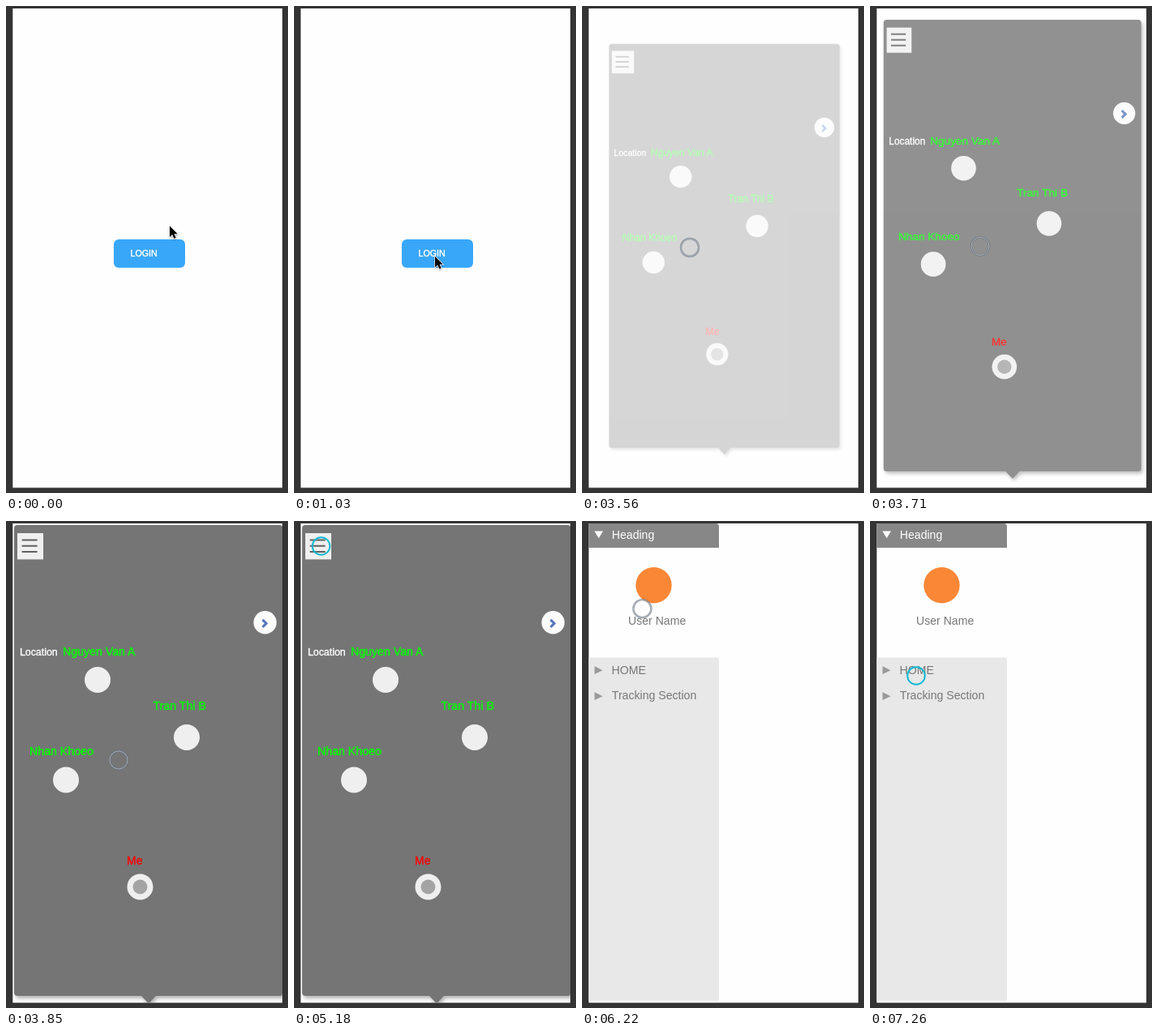
An HTML page that plays this animation: 348 by 601 pixels, repeating every 8 s.

```html
<!DOCTYPE html>
<html lang="en">
<head>
<meta charset="utf-8">
<title>Prototype walkthrough</title>
<style>
  html, body { margin: 0; width: 100%; height: 100%; overflow: hidden; background: #343434; }
  svg { display: block; width: 100%; height: 100%; }
  text { font: 14.1px "Liberation Sans", Arial, sans-serif; }
  .page { transform-origin: 174.5px 299px; }
  .login-label { font-size: 10.7px; fill: #fff; stroke: #fff; stroke-width: .4px; }
  .caption { font-size: 12.4px; fill: #fff; stroke: #fff; stroke-width: .35px; }
  .friend { font-size: 14.2px; fill: #0f0; stroke: #0f0; stroke-width: .35px; }
  .me { fill: #f00; stroke: #f00; stroke-width: .35px; }
  .menu-text { fill: #777; }
  .panel { fill: #757575; filter: drop-shadow(2px 3px 2px rgba(0, 0, 0, .3)); }
  .dot { fill: #efefef; }
  .ring { fill: none; }
  #arrow { filter: drop-shadow(0 1px 1px rgba(0, 0, 0, .35)); }
</style>
</head>
<body>
<svg viewBox="0 0 348 601">
  <defs>
    <clipPath id="screen"><rect x="8.3" y="3" width="332.7" height="591.5"/></clipPath>
  </defs>
  <rect width="348" height="601" fill="#343434"/>
  <rect x="8.3" y="3" width="332.7" height="591.5" fill="#fefefe"/>

  <g clip-path="url(#screen)">
    <g id="login" class="page">
      <rect x="133" y="288" width="88" height="35" rx="6" fill="#38a7f9"/>
      <text class="login-label" x="153.5" y="309">LOGIN</text>
    </g>

    <g id="map" class="page">
      <g class="panel">
        <rect x="10" y="5" width="331.5" height="581" rx="4"/>
        <path d="M166.5 585.5H185.5L176 595.5Z"/>
      </g>
      <rect class="dot" x="14" y="15" width="32" height="32.4"/>
      <path d="M19.6 23.4H38.6M19.6 30.7H38.6M19.6 38H38.6" stroke="#606060" stroke-width="2"/>
      <circle cx="319.7" cy="125.3" r="14.2" fill="#fcfcfc"/>
      <path d="M316.6 121.8L321.2 126.4L316.6 131" fill="none" stroke="#5677bb" stroke-width="3.1"/>
      <text class="caption" x="16.9" y="166">Location</text>
      <text class="friend" x="69.9" y="166">Nguyen Van A</text>
      <text class="friend" x="181.5" y="232.5">Tran Thi B</text>
      <text class="friend" x="29" y="288.5">Nhan Khoeo</text>
      <text class="me" x="149" y="424">Me</text>
      <circle class="dot" cx="113" cy="196" r="16"/>
      <circle class="dot" cx="223" cy="267" r="16"/>
      <circle class="dot" cx="74" cy="319.5" r="16"/>
      <circle class="dot" cx="165.5" cy="451.5" r="16"/>
      <circle cx="165.5" cy="451.5" r="9" fill="#a4a4a4"/>
    </g>

    <g id="menu" class="page">
      <path d="M8 3H165Q169 3 169 7V33H8Z" fill="#878787"/>
      <path d="M15.3 12.5H26L20.6 21.3Z" fill="#fff"/>
      <text x="36.8" y="21.7" fill="#fff">Heading</text>
      <circle cx="88.5" cy="79.2" r="22.2" fill="#f98736"/>
      <text class="menu-text" x="57" y="128">User Name</text>
      <rect x="8" y="168.5" width="161" height="423.5" fill="#e8e8e8"/>
      <path d="M15.5 179.3L25.5 184.2L15.5 189.1ZM15.5 211.3L25.5 216.2L15.5 221.1Z" fill="#999"/>
      <text class="menu-text" x="36.6" y="188.6">HOME</text>
      <text class="menu-text" x="36.8" y="220.4">Tracking Section</text>
    </g>
  </g>

  <g id="cursor">
    <path id="arrow" d="M.5 .5V14L3.7 11L5.9 16L8.2 15L6 10.2H10.2Z"
          stroke="#fff" stroke-width="1.4" paint-order="stroke"/>
    <g id="ring" class="ring">
      <circle cx="2.5" cy="2.5" r="11" stroke="#66717f" stroke-opacity=".7" stroke-width="2.4"/>
      <circle cx="2.5" cy="2.5" r="11" stroke="#d3dae2" stroke-opacity=".55"/>
    </g>
    <circle id="link" class="ring" cx="2.5" cy="2.5" r="10.8" stroke="#12bad4" stroke-width="2"/>
  </g>
</svg>

<script>
const LOOP = 8000, STEP = LOOP / 54;
const FADE = 100, POP = 350;
const MAP_IN = 3490, MENU_IN = 5763;
const $ = id => document.getElementById(id);

// Pointer moves: begin, end, and the place reached
const HOME = [201.5, 271];
const moves = [
  [0, 290, 197.5, 286.5],
  [440, 1030, 173.5, 308.5],
  [3260, 3555, 130.5, 295.5],
  [3555, 3850, 136.5, 292.5],
  [3850, 4440, 111.5, 177.5],
  [4440, 5180, 31, 28.5],
  [5780, 6370, 79.5, 120],
  [6370, 6810, 54.5, 188.5]
];
const looks = [
  [0, 'arrow'], [2500, 'link'], [3400, 'ring'], [5180, 'link'],
  [MENU_IN, 'arrow'], [6000, 'ring'], [7250, 'link']
];

const clamp = v => Math.min(1, Math.max(0, v));
const smooth = p => p * p * (3 - 2 * p);

// cubic-bezier(0, 0, .58, 1), solved by bisection
function easeOut(x) {
  let lo = 0, hi = 1;
  for (let i = 0; i < 20; i++) {
    const s = (lo + hi) / 2;
    if (s * s * (1.74 - .74 * s) < x) lo = s; else hi = s;
  }
  return smooth(lo);
}

const popIn = (t, start) => easeOut(clamp((t - start) / POP));
const fadeOut = (t, end) => clamp((end - t) / FADE);

function showPage(id, enter, leave) {
  const style = $(id).style;
  style.opacity = enter * leave;
  style.transform = `scale(${.8 + .2 * enter})`;
}

function pointerAt(t) {
  let [x, y] = HOME;
  for (const [begin, end, toX, toY] of moves) {
    const p = smooth(clamp((t - begin) / (end - begin)));
    x += (toX - x) * p;
    y += (toY - y) * p;
  }
  return [x, y];
}

function draw(now) {
  // The picture holds between steps, as in a slow screen recording.
  const t = Math.floor((now % LOOP + 9) / STEP) % 54 * STEP;
  showPage('login', 1, fadeOut(t, MAP_IN));
  showPage('map', popIn(t, MAP_IN), fadeOut(t, MENU_IN));
  showPage('menu', popIn(t, MENU_IN), 1);
  $('cursor').setAttribute('transform', `translate(${pointerAt(t)})`);
  const [, look] = looks.findLast(([from]) => from <= t);
  for (const id of ['arrow', 'ring', 'link']) $(id).style.display = id === look ? '' : 'none';
}

const start = performance.now();
function tick() {
  draw(performance.now() - start);
  requestAnimationFrame(tick);
}
tick();
</script>
</body>
</html>
```
